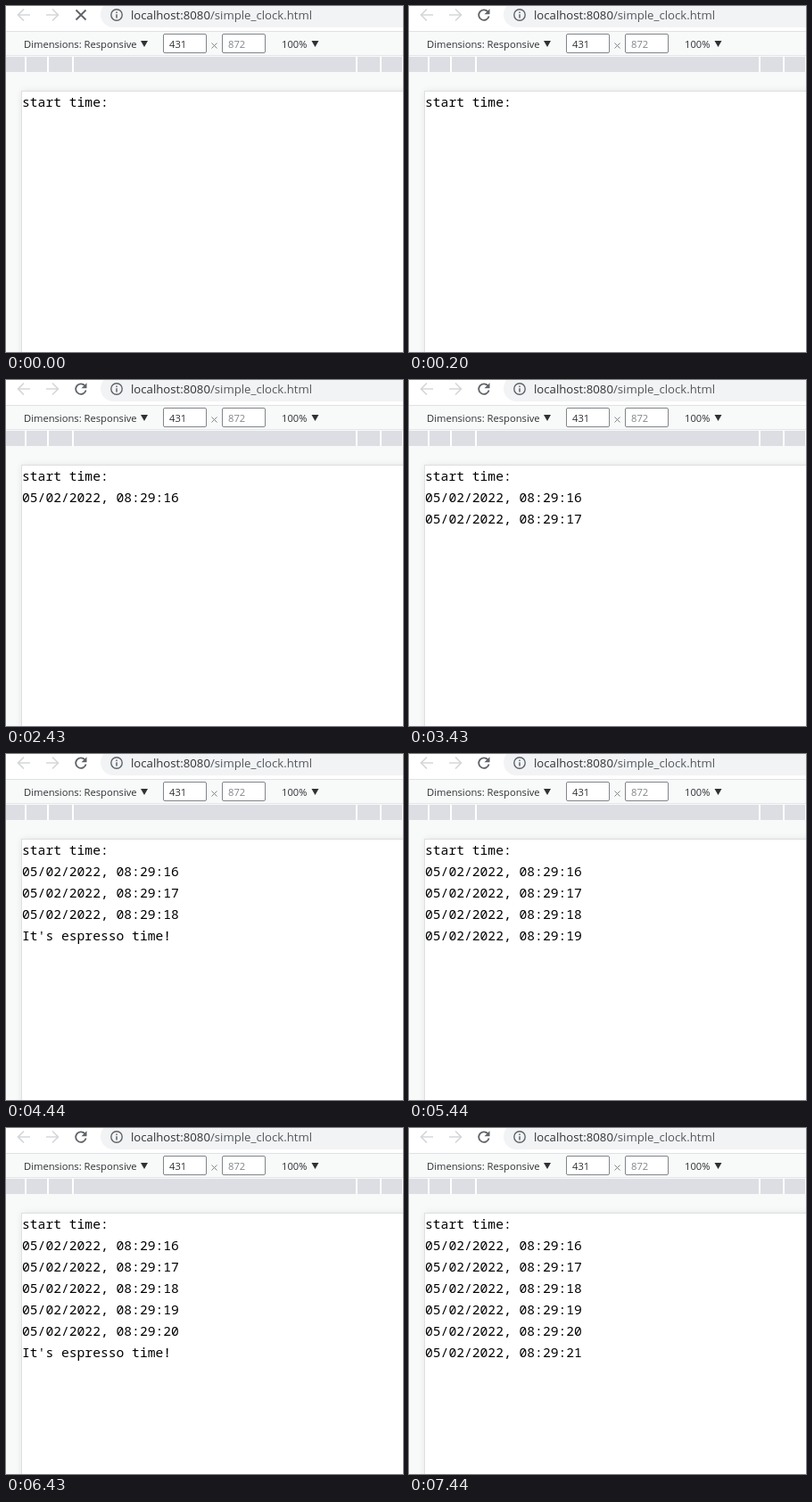
An HTML page that plays this animation: 445 by 388 pixels, repeating every 8000 ms.

```html
<!DOCTYPE html>
<html lang="en">
<head>
<meta charset="utf-8">
<title>Simple clock</title>
<style>
  html, body { margin: 0; width: 100%; height: 100%; overflow: hidden; background: #f8f9f9; }
  svg { display: block; }
  text { white-space: pre; }
  .ui { font: 11.2px "Open Sans", "Noto Sans", sans-serif; fill: #303134; }
  .url { font: 13.2px "Open Sans", "Noto Sans", sans-serif; fill: #303236; }
  .page { font: 14.667px "Noto Sans Mono", "DejaVu Sans Mono", monospace; fill: #000; }
  .icon { fill: none; stroke: #5f6368; stroke-width: 1.8; }
  .off { stroke: #d5d7da; stroke-width: 1.7; }
  .field { fill: #fff; stroke: #80868b; }
</style>
</head>
<body>
<svg width="445" height="388" viewBox="0 0 445 388">
  <defs>
    <filter id="soft" x="-10%" y="-10%" width="120%" height="120%"><feGaussianBlur stdDeviation="4"/></filter>
  </defs>

  <!-- address bar -->
  <rect width="445" height="28" fill="#fff"/>
  <rect x="106" y="-5" width="400" height="29" rx="14.5" fill="#f1f3f4"/>
  <path d="M0 28.5H445" stroke="#dfe1e4"/>
  <path class="icon off" d="M27 10H14M20 3.5L13.5 10L20 16.5M45 10H58M52 3.5L58.5 10L52 16.5"/>
  <path id="stop" class="icon" d="M78.5 4.5L89.5 15.5M89.5 4.5L78.5 15.5"/>
  <g id="reload">
    <path class="icon" d="M88.3 6.2A5.8 5.8 0 1 0 89.6 11.6"/>
    <path d="M90.5 3.2V9.2H84.5Z" fill="#5f6368"/>
  </g>
  <circle class="icon" cx="124" cy="10" r="6.2" style="stroke-width:1.4"/>
  <path class="icon" d="M124 9.2V13.4M124 6.4V7.9" style="stroke-width:1.5"/>
  <text class="url" x="140" y="15">localhost:8080<tspan fill="#55585d">/simple_clock.html</tspan></text>

  <!-- device toolbar -->
  <text class="ui" x="20" y="47">Dimensions: Responsive</text>
  <path d="M151 39h8l-4 7zM342.5 39h8l-4 7z" fill="#303134"/>
  <rect class="field" x="176.5" y="31.500" width="48" height="21" rx="1.5"/>
  <rect class="field" x="242.500" y="31.500" width="48" height="21" rx="1.5"/>
  <text class="ui" x="183" y="47">431</text>
  <text class="ui" x="249" y="47" style="fill:#80868b">872</text>
  <path d="M230.500 41.500l6 6m0 -6l-6 6" stroke="#80868b"/>
  <text class="ui" x="309" y="47">100%</text>
  <path d="M0 55.500H445" stroke="#e4e6e8"/>
  <rect y="57" width="445" height="17" fill="#dcdee3"/>
  <path d="M22 57v17M47 57v17M75 57v17M393 57v17M420 57v17M445 57v17" stroke="#fff" stroke-width="2"/>

  <!-- page -->
  <rect x="18" y="96" width="450" height="320" fill="#000" opacity=".1" filter="url(#soft)"/>
  <rect x="17.500" y="95.500" width="450" height="320" fill="#fff" stroke="#dddfe1"/>
  <text class="page" x="18" y="113">start time:</text>
  <g id="log" class="page"></g>
</svg>
<script>
  const LOOP = 8000, FIRST_SECOND = 16;
  const ticks = [2430, 3430, 4440, 5440, 6430, 7440];
  const byId = id => document.getElementById(id);
  let shown = -1;

  function showLog(count) {
    if (count === shown) return;
    shown = count;
    const lines = ticks.slice(0, count).map((_, i) => `05/02/2022, 08:29:${FIRST_SECOND + i}`);
    if (count > 1 && count % 2) lines.push("It's espresso time!");
    byId("log").innerHTML = lines.map((line, i) => `<text x="18" y="${137 + 24 * i}">${line}</text>`).join("");
  }

  function draw(now) {
    const t = now % LOOP, loading = t < 200;
    byId("stop").style.display = loading ? "" : "none";
    byId("reload").style.display = loading ? "none" : "";
    showLog(ticks.filter(tick => t >= tick).length);
    requestAnimationFrame(() => draw(performance.now() - start));
  }

  const start = performance.now();
  draw(0);
</script>
</body>
</html>
```
